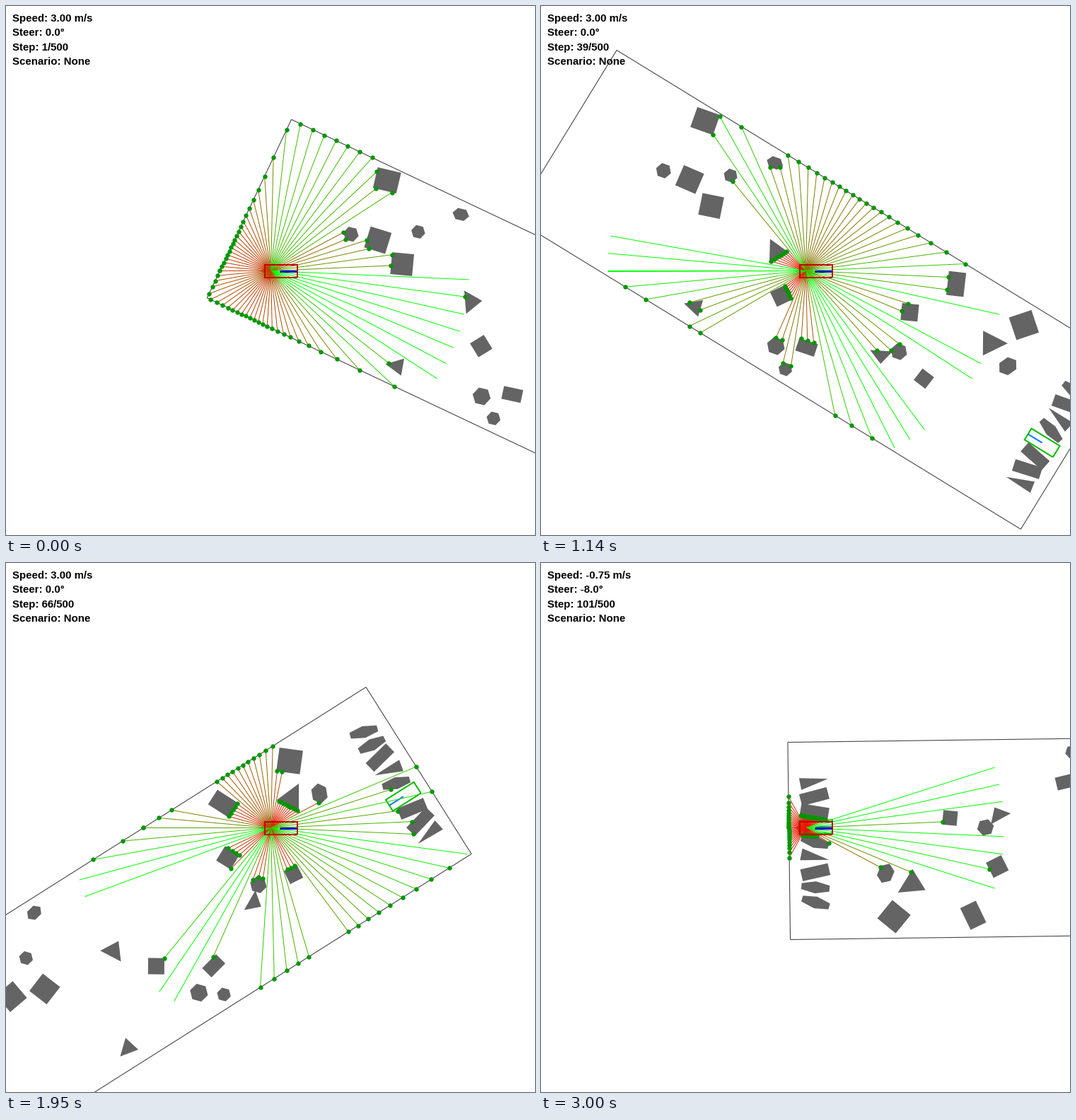
A matplotlib script for the animation above (3030 ms loop, 748x748 px).

```python
import numpy as np
import matplotlib.pyplot as plt
from matplotlib.animation import FuncAnimation
from matplotlib.collections import LineCollection, PolyCollection

SIZE, FRAMES, INTERVAL = 748, 101, 30
ROOM_W, ROOM_H = 841, 279
ORIGIN = np.array([374, 374])   # rear axle on screen
STEP = 9.35                     # pixels per step at top speed
TOP_SPEED = 3
WHEELBASE = 28
RANGE = 280.5
REVERSE_AT = 84
PX = 0.72                       # points per pixel
SUB = 20                        # integration substeps per frame

# Each turn: start, duration, degrees
START_HEADING = -25.3
TURNS = np.array([(0, 9, 13.8), (12, 9, 22.5), (21.6, 10, -42.5),
                  (44, 6, 6.8), (50, 11, 57), (76, 8, 81.4),
                  (84, 4, -9.6), (87, 7, 78), (97, 6, -2.7)])
# Points the drive passes through: time, x, y
WAYPOINTS = np.array([(0, 65.2, 205.9), (12, 171.1, 173.9), (27, 301.4, 175.6),
                      (50, 488.1, 70.4), (65, 621, 96.3), (87, 742, 194.5),
                      (100, 817, 157.7)])


def heading(t):
    start, length, degrees = TURNS.T
    s = np.clip((t[:, None] - start) / length, 0, 1)
    return np.radians(START_HEADING + (degrees * s**2 * (3 - 2*s)).sum(axis=1))


def speed(t):
    """Cruise with one short dip, then reverse and brake into the bay."""
    dip = 0.5 * np.clip(1 - np.abs(t - 23) / 2, 0, 1)
    brake = np.clip((99 - t) / 4, 0.25, 1)
    return TOP_SPEED * np.where(t > REVERSE_AT, -brake, 1 - dip)


def drive():
    """Integrate the bicycle model and pin it to the waypoints."""
    t = np.linspace(0, FRAMES - 1, (FRAMES - 1) * SUB + 1)
    head, v = heading(t), speed(t)
    step = v * STEP / TOP_SPEED
    path = np.cumsum(step[:, None] * np.c_[np.cos(head), np.sin(head)], axis=0) / SUB
    when = WAYPOINTS[:, 0]
    drift = WAYPOINTS[:, 1:] - path[(when * SUB).astype(int)]
    path += np.c_[np.interp(t, when, drift[:, 0]), np.interp(t, when, drift[:, 1])]
    steer = -np.degrees(np.arctan(WHEELBASE * np.gradient(head, t) / step))
    return path[::SUB], head[::SUB], v[::SUB], 2 * np.round(steer[::SUB] / 2) + 0.0


PATH, HEAD, SPEED, STEER = drive()


def rotation(a):
    return np.array([[np.cos(a), -np.sin(a)], [np.sin(a), np.cos(a)]])


def to_screen(pts, pos, a):
    return ORIGIN + (pts - pos) @ rotation(a)


def ngon(n, x, y, w, h, deg=0):
    """Polygon stretched to a w by h box, then turned."""
    a = (np.arange(n) + 0.5) * 2 * np.pi / n
    pts = np.c_[np.cos(a), np.sin(a)]
    low, high = pts.min(axis=0), pts.max(axis=0)
    pts = ((pts - low) / (high - low) - 0.5) * (w, h)
    return pts @ rotation(np.radians(deg)).T + (x, y)


def block(n, x, y, size, deg=18, aspect=None):
    aspect = aspect or (0.87 if n == 6 else 1)
    return ngon(n, x, y, size * aspect, size, deg)


# Loose blocks by number of sides: x, y, size, then angle and aspect if needed
LOOSE = {
    3: [(343, 122.5, 33, 150, 0.73), (280, 252.5, 24.5, -15),
        (545.5, 175, 32, -118, 0.58), (673, 73.5, 35, 149)],
    4: [(159, 20, 30, -12, 1.13), (183.5, 102, 31, -8), (229, 118, 31, -20),
        (379.5, 175, 23, 33), (448.5, 218, 18.5, -13, 1.5), (582, 31, 34, -25, 0.72),
        (547, 99.5, 24, -26), (613, 169, 20.5, 6), (694, 30.5, 33.5, 40)],
    6: [(274, 19, 24, 78, 0.67), (230, 67, 20), (145.5, 110.7, 22), (410.5, 239, 26),
        (439, 260, 20), (563, 155, 24), (705, 92, 29, 23, 0.72)],
}
# Parked row along the far wall: sides and tilt, with one free bay
ROW = [(6, 17), (6, 6), (4, -12), (3, 12), (6, 17), None, (4, 10), (4, -14), (3, -10)]

BLOCKS = [block(n, *spec) for n, specs in LOOSE.items() for spec in specs]
BLOCKS += [block(slot[0], ROOM_W - 36.5, 52 + 21.4 * k, 17, slot[1], 2.35)
           for k, slot in enumerate(ROW) if slot]
WALLS = ngon(4, ROOM_W / 2, ROOM_H / 2, ROOM_W, ROOM_H)
BAY = np.array([ROOM_W - 38, 159])
GOAL = ngon(4, *BAY, 47, 18.7)
GOAL_DIR = np.array([BAY, BAY - (23, 0)])

EDGES_A = np.vstack([WALLS] + BLOCKS)
EDGES_B = np.vstack([np.roll(p, -1, axis=0) for p in [WALLS] + BLOCKS])
RAYS = np.radians(np.linspace(-180, 180, 72))


def cross(a, b):
    return a[..., 0] * b[..., 1] - a[..., 1] * b[..., 0]


def scan(pos, head):
    """Distance to the nearest edge along each ray."""
    d = np.c_[np.cos(RAYS + head), np.sin(RAYS + head)][:, None]
    edge, rel = EDGES_B - EDGES_A, EDGES_A - pos
    den = cross(d, edge[None])
    den = np.where(np.abs(den) < 1e-9, 1e-9, den)
    dist = cross(rel, edge)[None] / den
    along = cross(rel[None], d) / den
    hit = (dist > 0) & (along >= 0) & (along <= 1)
    return np.where(hit, dist, RANGE).min(axis=1).clip(max=RANGE)


fig = plt.figure(figsize=(SIZE / 100, SIZE / 100), dpi=100, facecolor="white")
ax = fig.add_axes([0, 0, 1, 1])
ax.set_xlim(-0.5, SIZE - 0.5)
ax.set_ylim(SIZE - 0.5, -0.5)
ax.axis("off")


def outline(color, width, z):
    return ax.plot([], [], color=color, lw=width * PX, zorder=z,
                   solid_joinstyle="miter", solid_capstyle="butt")[0]


def trace(line, pts):
    """Set a line's points, closing any polygon."""
    line.set_data(*(np.vstack([pts, pts[:1]]) if len(pts) > 2 else pts).T)


blocks = PolyCollection([], facecolors="#646464", edgecolors="none", zorder=1)
beams = LineCollection([], linewidths=PX, zorder=4)
ax.add_collection(blocks)
ax.add_collection(beams)
walls = outline("#464646", 1.1, 2)
goal = outline("#00be00", 2, 3)
goal_dir = outline("#0078ff", 2, 3)
dots = ax.plot([], [], "o", color="#009600", ms=6.4 * PX, mew=0, zorder=5)[0]
trace(outline("#c80000", 2, 6), ngon(4, 388.3, 374.8, 46, 18))
trace(outline("#0000c8", 3, 7), np.array([(387, 374.5), (411, 374.5)]))
labels = [ax.text(9, 21.2 + 20.5 * k, "", family="Liberation Sans", weight="bold",
                  size=15 * PX, va="baseline", zorder=8) for k in range(4)]


def update(i):
    pos, head = PATH[i], HEAD[i]
    blocks.set_verts([to_screen(p, pos, head) for p in BLOCKS])
    for line, pts in ((walls, WALLS), (goal, GOAL), (goal_dir, GOAL_DIR)):
        trace(line, to_screen(pts, pos, head))

    dist = scan(pos, head)
    ends = ORIGIN + dist[:, None] * np.c_[np.cos(RAYS), np.sin(RAYS)]
    near = dist / RANGE
    beams.set_segments([(ORIGIN, e) for e in ends])
    beams.set_color(np.c_[1 - near, near, np.zeros_like(near)])
    dots.set_data(*ends[dist < RANGE].T)

    lines = (f"Speed: {SPEED[i]:.2f} m/s", f"Steer: {STEER[i]:.1f}°",
             f"Step: {i + 1}/500", "Scenario: None")
    for label, line in zip(labels, lines):
        label.set_text(line)
    return [blocks, beams, walls, goal, goal_dir, dots, *labels]


anim = FuncAnimation(fig, update, frames=FRAMES, interval=INTERVAL,
                     repeat=True, repeat_delay=0, blit=False)
plt.show()
```
